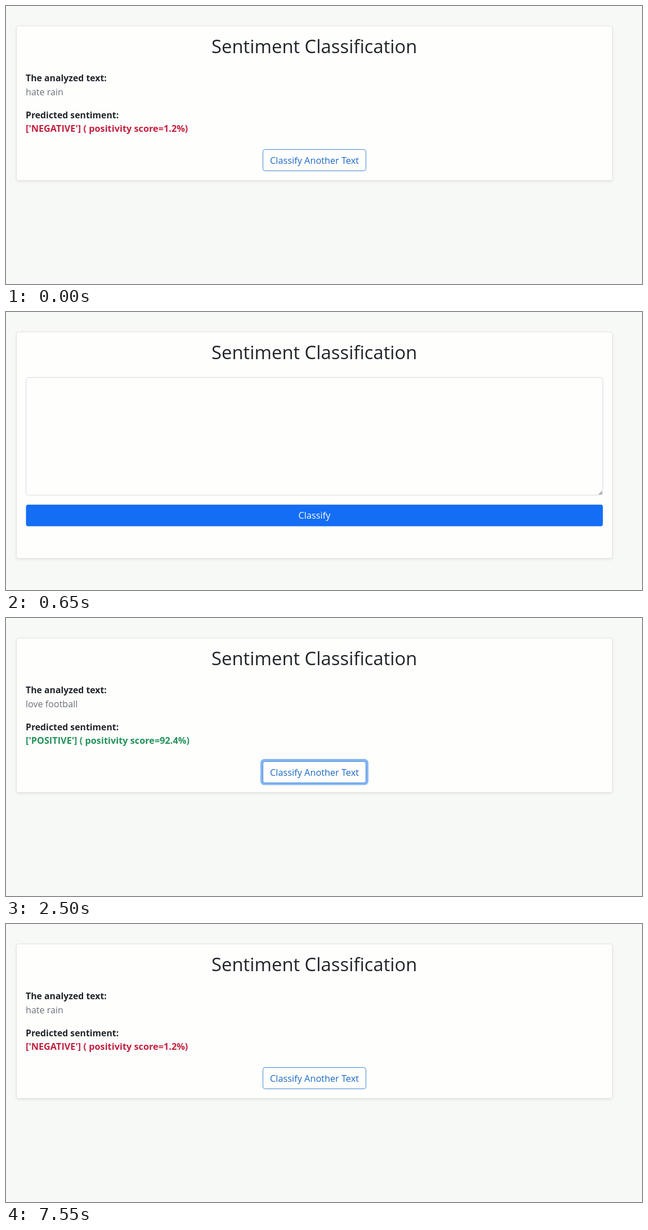
Animation, 1130 px wide and 495 px high, one loop 7600 ms. Source, as an HTML page:

```html
<!DOCTYPE html>
<html lang="en">
<head>
<meta charset="utf-8">
<title>Sentiment Classification</title>
<style>
html, body { margin: 0; width: 100%; height: 100%; overflow: hidden; background: #f7f9f7; }
svg { display: block; width: 1130px; height: 495px; }
text { font: 16.3px "Open Sans", "Noto Sans", sans-serif; fill: #212529; }
.mid { text-anchor: middle; }
.title { font-size: 32.8px; font-weight: 500; }
.label { font-size: 15.8px; font-weight: 700; }
.score { font-size: 16.3px; font-weight: 700; }
.muted { font-size: 16.1px; fill: #6a7077; }
.red { fill: #c2203f; }
.green { fill: #23925a; }
.link { font-size: 16.3px; fill: #1a69c8; }
.card { fill: #fefefd; stroke: #e1e3e1; filter: drop-shadow(0 2px 2px rgba(0, 0, 0, .075)); }
.field { fill: #fefefd; stroke: #d6d9da; }
.outline { fill: #fefefd; stroke: #4288d4; }

/* One 7.6 s timeline shared by every part */
.negative, .dark, .form, .error, .positive, .focus, .ring, .typed tspan, .typed2 {
  animation: 7.6s step-end infinite;
}
.negative { animation-name: negative; }
.dark { animation-name: dark; }
.form { animation-name: form; }
.error { animation-name: error; }
.positive { animation-name: positive; }
.focus { animation-name: focus; }
.ring { animation-name: ring; }
.typed2 { animation-name: typed2; }
.typed .k1 { animation-name: k1; }
.typed .k2 { animation-name: k2; }
.typed .k3 { animation-name: k3; }
.typed .k4 { animation-name: k4; }
.typed .k5 { animation-name: k5; }

@keyframes negative { 0%, 46.052% { opacity: 1; } 7.236%, 46.051% { opacity: 0; } 100% { opacity: 1; } }
@keyframes dark { 0%, 8.552%, 100% { opacity: 0; } 7.236% { opacity: 1; } }
@keyframes form { 0%, 26.315%, 46.052%, 100% { opacity: 0; } 8.552%, 36.184% { opacity: 1; } }
@keyframes error { 0%, 26.315%, 100% { opacity: 0; } 17.105% { opacity: 1; } }
@keyframes positive { 0%, 36.184%, 100% { opacity: 0; } 26.315% { opacity: 1; } }
@keyframes focus {
  0%, 26.315%, 46.052%, 100% { opacity: 0; }
  21.052% { opacity: .4; }
  22.368% { opacity: .8; }
  23.026%, 40.789% { opacity: 1; }
}
@keyframes ring {
  0%, 36.184%, 100% { opacity: 0; }
  31.578% { opacity: .4; }
  32.236% { opacity: .8; }
  32.894% { opacity: 1; }
}
@keyframes typed2 { 0%, 46.052%, 100% { opacity: 0; } 40.789% { opacity: 1; } }
@keyframes k1 { 0%, 26.315%, 100% { visibility: hidden; } 21.052% { visibility: visible; } }
@keyframes k2 { 0%, 26.315%, 100% { visibility: hidden; } 22.368% { visibility: visible; } }
@keyframes k3 { 0%, 26.315%, 100% { visibility: hidden; } 23.026% { visibility: visible; } }
@keyframes k4 { 0%, 26.315%, 100% { visibility: hidden; } 24.999% { visibility: visible; } }
@keyframes k5 { 0%, 26.315%, 100% { visibility: hidden; } 25.657% { visibility: visible; } }
</style>
</head>
<body>
<svg viewBox="0 0 1130 495">
  <defs>
    <g id="result">
      <rect class="card" x="18.5" y="35.5" width="1059" height="275" rx="4"/>
      <text class="label" x="35" y="134">The analyzed text:</text>
      <text class="label" x="35" y="200">Predicted sentiment:</text>
    </g>
    <g id="again">
      <rect class="outline" x="456.5" y="255.5" width="183" height="38" rx="4"/>
      <text class="link mid" x="548" y="281">Classify Another Text</text>
    </g>
  </defs>

  <rect width="1130" height="495" fill="#f7f9f7"/>

  <g class="negative">
    <use href="#result"/>
    <text class="muted" x="35" y="159">hate rain</text>
    <text class="score red" x="35" y="224">['NEGATIVE'] ( positivity score=1.2%)</text>
    <use href="#again"/>
  </g>

  <g class="positive">
    <use href="#result"/>
    <text class="muted" x="35" y="159">love football</text>
    <text class="score green" x="35" y="224">['POSITIVE'] ( positivity score=92.4%)</text>
    <rect class="ring" x="452" y="251" width="192" height="46.5" rx="7" fill="#86b6f5"/>
    <use href="#again"/>
  </g>

  <g class="form">
    <rect class="card" x="18.5" y="35.5" width="1059" height="403" rx="4"/>
    <g class="error">
      <rect class="card" x="18.5" y="35.5" width="1059" height="428" rx="4"/>
      <text class="red" x="35" y="424">No text was inserted!!. Please type/copy English text.</text>
    </g>
    <rect class="field" x="35.5" y="116.5" width="1025" height="209.5" rx="4"/>
    <g class="focus">
      <rect x="32" y="113" width="1032" height="216.5" rx="7" fill="#cfe1fa"/>
      <rect x="35.5" y="116.5" width="1025" height="209.5" rx="4" fill="#fefefd" stroke="#a3c6f2"/>
    </g>
    <path d="M1059 318V325H1052Z" fill="#b3b5b5"/>
    <text class="typed" x="47.5" y="141"><tspan class="k1">I</tspan><tspan class="k2"> lov</tspan><tspan class="k3">e foo</tspan><tspan class="k4">tba</tspan><tspan class="k5">ll</tspan></text>
    <text class="typed2" x="47.5" y="141">I hate rain</text>
    <rect x="35.5" y="343" width="1025" height="38.5" rx="4" fill="#146ef5"/>
    <text class="mid" x="548" y="368" style="fill:#fff">Classify</text>
  </g>

  <text class="title mid" x="547.8" y="84">Sentiment Classification</text>

  <g class="dark">
    <rect width="1130" height="495" fill="#2b2a30"/>
    <rect y="491" width="1130" height="4" fill="#27262d"/>
  </g>
</svg>
</body>
</html>
```
